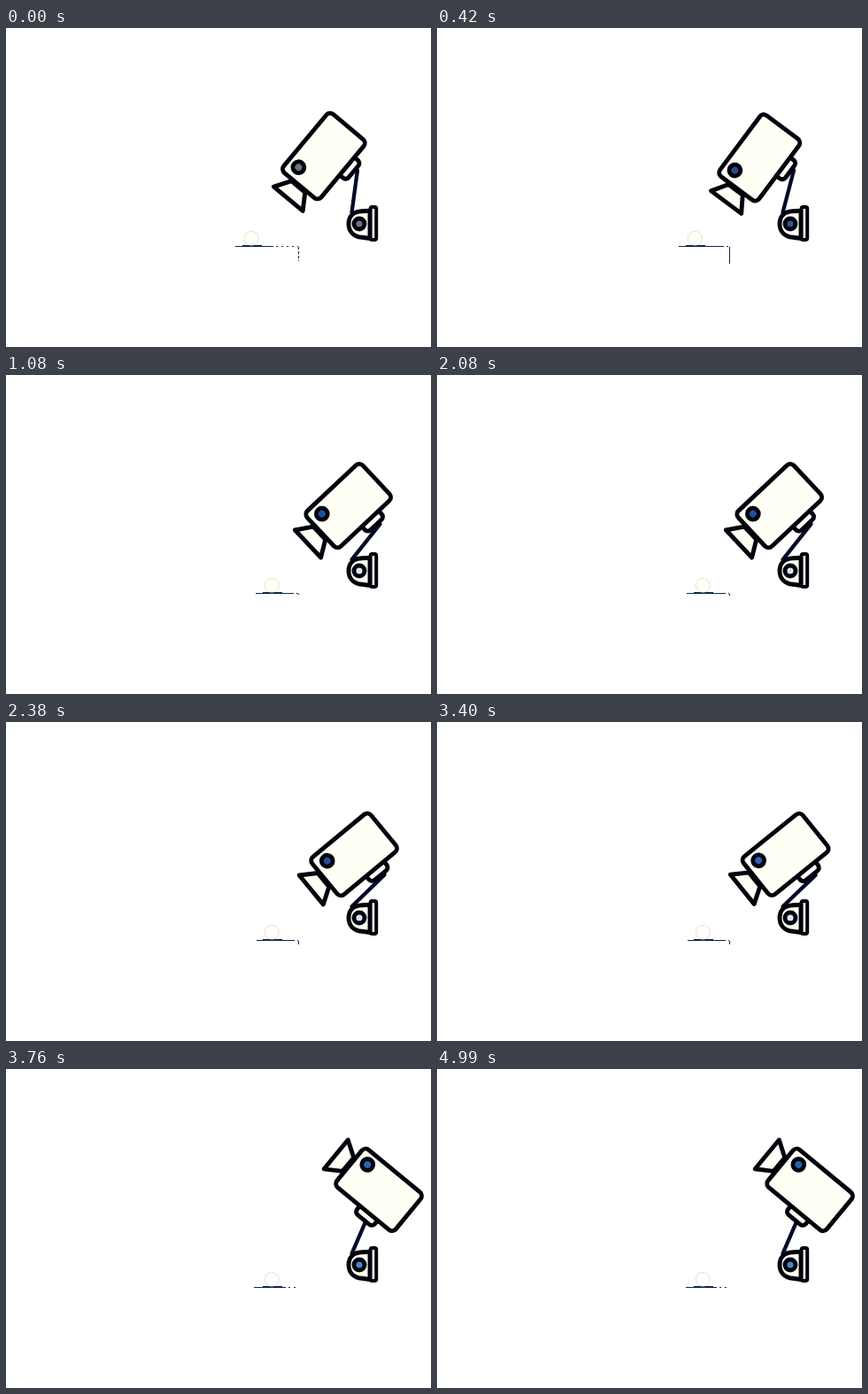
Animation of 480 by 360 pixels, one loop 5.09 s. Source, as an HTML page:

```html
<!DOCTYPE html>
<html lang="en">
<head>
<meta charset="utf-8">
<title>Security camera</title>
<style>
  html, body { margin: 0; width: 100%; height: 100%; overflow: hidden; background: #fff; }
  svg { display: block; width: 100%; height: 100%; }
  .part { fill: #fffff5; stroke: #00020c; stroke-width: 4.9; stroke-linejoin: round; }
  .floor { fill: none; stroke: #10254f; stroke-width: 1; shape-rendering: crispEdges; }
</style>
</head>
<body>
<svg viewBox="0 0 480 360">
  <g class="floor">
    <path id="floor"/>
    <path id="dashes" stroke-dasharray="2 4"/>
    <path id="edge"/>
  </g>
  <g id="ball">
    <path class="floor" d="M-10 245.5H12"/>
    <circle cy="237.5" r="8" fill="#fffff5" stroke="#8d919b" stroke-width=".7" stroke-dasharray="1 1.5"/>
  </g>
  <line id="rod" stroke="#030a26" stroke-width="4.3" stroke-linecap="round"/>
  <g class="part">
    <path d="M411 206.3L402 206.7C392 207 387 213 387 221S392 235.3 402 236.3L411 237.5Z"/>
    <rect x="411.6" y="202" width="6.6" height="37" rx="2" stroke-width="4"/>
    <circle id="baseIris" cx="399" cy="221" r="6"/>
  </g>
  <g id="camera" class="part">
    <rect x="-5" y="25" width="26" height="12" rx="4.5"/>
    <path d="M-45 -10L-62.7 -21.3V21.3L-45 10Z"/>
    <rect x="-43" y="-27.5" width="86" height="55" rx="5.6"/>
    <circle id="lensIris" cx="-28" cy="-13.8" r="6.4"/>
  </g>
</svg>
<script>
const LOOP = 5090, STEP = 30;
const BASE = { x: 390.5, y: 208.3 };
const MOUNT = { x: 8, y: 33 };
const ROD_TIP = { x: 12, y: 39.5 };
const el = id => document.getElementById(id);
const set = (id, attrs) => {
  for (const name in attrs) el(id).setAttribute(name, attrs[name]);
};
const mix = (a, b, p) => a + (b - a) * p;
const progress = (t, from, to) => Math.min(1, Math.max(0, (t - from) / (to - from)));
const easeInOut = (p, power = 2) =>
  p < .5 ? (2 * p) ** power / 2 : 1 - (2 - 2 * p) ** power / 2;
const rad = deg => deg * Math.PI / 180;

function along(t, keys) {
  let value = keys[0][1];
  for (let i = 1; i < keys.length; i++) {
    const [t0, a] = keys[i - 1], [t1, b] = keys[i];
    if (t >= t0) value = mix(a, b, progress(t, t0, t1));
  }
  return value;
}

function held(t, keys) {
  return keys.filter(([start]) => t >= start).pop()[1];
}

function turn(point, deg) {
  const c = Math.cos(rad(deg)), s = Math.sin(rad(deg));
  return { x: point.x * c - point.y * s, y: point.x * s + point.y * c };
}

function pose(t) {
  const p = progress(t, 60, 1080);
  const follow = easeInOut(p, 2.3);
  const nudge = easeInOut(progress(t, 2050, 2440));
  const swing = easeInOut(progress(t, 3370, 3760));
  // The head dips towards the ball before the arm catches up.
  const dip = 31 * p * (1 - p) ** 2;
  return {
    arm: -1.3 + 31.6 * follow + 8 * nudge - 17.5 * swing,
    reach: 48.8 - .2 * nudge - 4.3 * swing,
    head: -50.2 + 7 * follow - dip + 3.9 * nudge + 78.9 * swing,
    ball: 277 + 23.3 * (1 - (1 - p) ** 2.2)
  };
}

function drawCamera({ arm, reach, head }) {
  const mount = turn(MOUNT, head), tip = turn(ROD_TIP, head);
  const x = BASE.x + reach * Math.sin(rad(arm)) - mount.x;
  const y = BASE.y - reach * Math.cos(rad(arm)) - mount.y;
  set('camera', { transform: `translate(${x} ${y}) rotate(${head})` });
  set('rod', { x1: BASE.x, y1: BASE.y, x2: x + tip.x, y2: y + tip.y });
}

function drawFloor(t, ball) {
  const left = ball - 19.3 + along(t, [[2050, 1], [2440, 2], [3370, 2], [3760, -.8], [4960, -.8], [4990, .2]]);
  const solid = along(t, [[60, 302], [420, 324], [600, 324], [750, 313], [1080, 325], [2440, 326], [3400, 326], [3760, 316]]);
  const drop = t < 600
    ? along(t, [[60, 16], [420, 19], [570, 22]])
    : along(t, [[600, 4], [750, 1], [2080, 2], [2440, 4], [3640, 4], [3760, 0]]);
  set('floor', { d: `M${left} 246.5H${solid}` });
  set('dashes', { d: `M${solid + 3} 246.5H330` });
  set('edge', { d: `M330.5 247v${drop}`, 'stroke-dasharray': t < 150 ? '3 2' : 'none' });
  set('ball', { transform: `translate(${ball})` });
}

function draw(time) {
  const t = Math.floor(time % LOOP / STEP) * STEP;
  const now = pose(t < 90 ? 0 : t);
  drawCamera(now);
  drawFloor(t, now.ball);
  set('lensIris', { fill: held(t, [[0, '#6d7280'], [240, '#2b4a88'], [600, '#5c6378'], [900, '#1f4f9c'], [2440, '#2a62b4']]) });
  set('baseIris', { fill: held(t, [[0, '#6d7280'], [240, '#2f5597'], [600, '#f4f6fa'], [1080, '#d8e5f5'], [3580, '#4a86cf']]) });
}

const start = performance.now();
function tick() {
  draw(performance.now() - start);
  requestAnimationFrame(tick);
}
tick();
</script>
</body>
</html>
```
